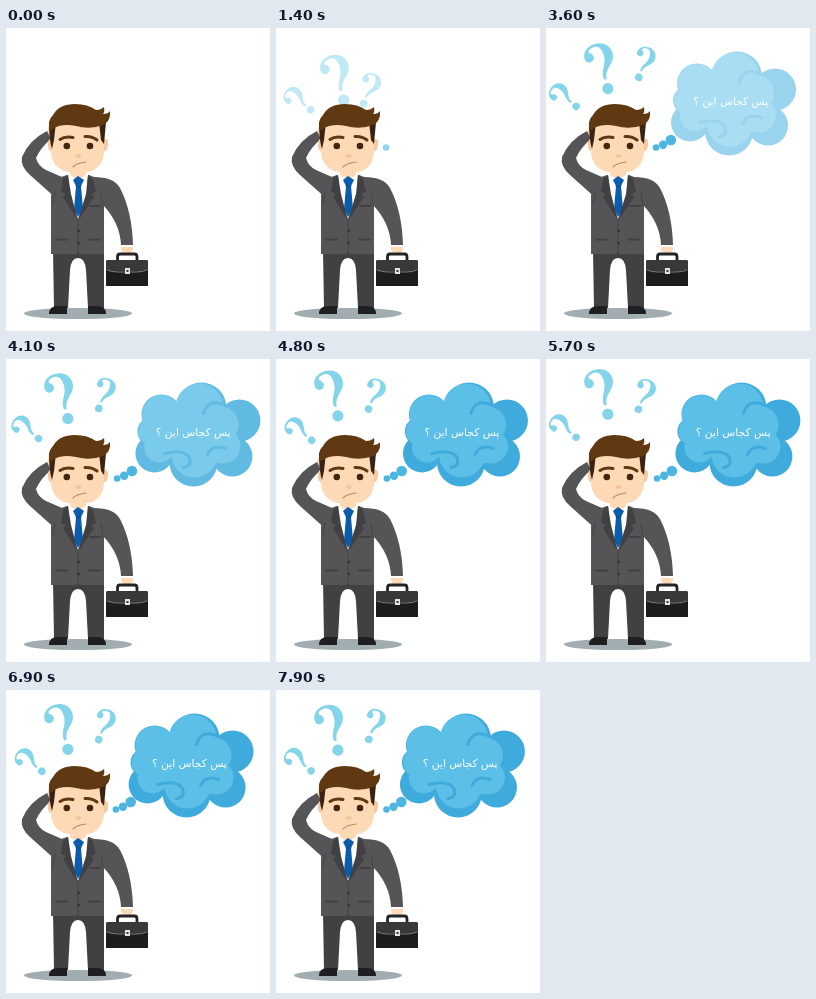
Recreate the animation shown at these times as an HTML page with a canvas. Size 264 by 303 pixels, loop 8 s.

```html
<!DOCTYPE html>
<html lang="fa">
<head>
<meta charset="utf-8">
<title>Puzzled man</title>
<style>
  html, body { margin: 0; width: 100%; height: 100%; overflow: hidden; background: #fff; }
  canvas { display: block; width: 264px; height: 303px; }
</style>
</head>
<body>
<canvas id="stage"></canvas>
<script>
const W = 264, H = 303, LOOP = 8000;
const canvas = document.getElementById('stage');
const ctx = canvas.getContext('2d');
const ratio = window.devicePixelRatio || 1;
canvas.width = W * ratio;
canvas.height = H * ratio;

const clamp = v => Math.min(1, Math.max(0, v));
const ramp = (t, from, to) => clamp((t - from) / (to - from));
const wave = (t, start, period) => Math.cos((t - start) / period * 2 * Math.PI);

function blobs(list) {
  const path = new Path2D();
  for (const [x, y, r] of list) {
    path.moveTo(x + r, y);
    path.arc(x, y, r, 0, 7);
  }
  return path;
}

const fill = (color, d) => ({ color, path: new Path2D(d) });
const line = (color, width, d) => ({ color, width, path: new Path2D(d) });

function paint({ color, width, path }) {
  if (width) {
    ctx.strokeStyle = color;
    ctx.lineWidth = width;
    ctx.stroke(path);
  } else {
    ctx.fillStyle = color;
    ctx.fill(path);
  }
}

const SUIT = '#555557', DARK = '#414042', SKIN = '#fdd9b6', HAIR = '#603811', BURN = '#3b2313';

const shadow = fill('#a1adb1', 'M18 285.5A54 5.6 0 0 1 126 285.5A54 5.6 0 0 1 18 285.5Z');

const man = [
  // legs and shoes
  fill(DARK, 'M47 222H98V280H82L80 242Q79 230 72 230Q65 230 64 242L62 280H48Z'),
  fill('#1f1e20', 'M43 286Q43 278 52 278H61V286ZM100 286Q100 278 91 278H82V286Z'),
  // raised arm
  fill(SKIN, 'M41 106Q41 96 48 97L54 112L46 116Z'),
  fill(SUIT, 'M41 103L45 111Q35 119 30 130Q32 138 40 142L56 149L52 172L24 147Q14 138 16 129Q23 112 41 103Z'),
  // hanging arm
  fill(SKIN, 'M115 217H127V221Q126 226 121 226Q116 225 115 221Z'),
  fill('#fff', 'M114 215H128V219H114Z'),
  fill(SUIT, 'M88 149Q108 149 114 160Q126 183 127 217H115Q114 195 97 177Z'),
  // jacket
  fill(SUIT, 'M61 147L52 150Q46 153 45 168V226H70L72 224L74 226H98V172L96 152L83 147Z'),
  line(DARK, 0.8, 'M47 176L49 164M97 178L95 164M72 192V224'),
  fill('#fff', 'M62 146H82L81 165L72 191L63 165Z'),
  fill(SKIN, 'M64 141H80V147L72 152L64 147Z'),
  fill('#0b5cab', 'M67 152L72 148L78 152L75 158L77 181L72 189L68 181L70 158Z'),
  line('#08467f', 0.8, 'M70 158H75'),
  fill(DARK, 'M62 147L57 151L55 164L60 166L57 169L72 193L65 166Z'),
  fill(DARK, 'M82 147L87 151L90 164L85 166L88 169L72 193L80 166Z'),
  line(DARK, 1.8, 'M50 211.5H61M83 211.5H94M84 178H94'),
  fill('#303032', 'M71.5 203a1.2 1.2 0 1 0 2.4 0a1.2 1.2 0 1 0 -2.4 0M71.5 215a1.2 1.2 0 1 0 2.4 0a1.2 1.2 0 1 0 -2.4 0'),
  // briefcase
  line('#242426', 2.8, 'M111.5 233V229Q111.5 226 114 226H128.5Q131 226 131 229V233'),
  fill('#1d1c1e', 'M100 234Q100 232 102 232H140Q142 232 142 234V258H100Z'),
  fill('#39393b', 'M100 234Q100 232 102 232H140Q142 232 142 234V241Q138 243 131 243H111Q104 243 100 241Z'),
  line('#a9a9aa', 0.7, 'M101 242Q106 244 112 244H130Q137 244 141 242'),
  fill('#e4e4e4', 'M119 240H124V246H119Z'),
  fill('#39393b', 'M120.5 242H122.5V244H120.5Z'),
  // head
  fill('#f6c9a2', 'M47 111Q42 109 42 117Q42 125 48 123ZM96 111Q103 109 102 117Q101 125 96 123Z'),
  fill(SKIN, 'M45 94H98V125Q97 138 86 143Q72 147 58 143Q46 138 45 125Z'),
  fill(BURN, 'M43 94H50L48 112L46 121Q43 112 43 94ZM93 94H100L98 116L95 112Z'),
  fill(HAIR, 'M43 100Q42 92 47 87Q53 76 69 76Q82 76 90 82Q95 82 98 79Q99 84 97 86Q102 86 104 83Q105 93 97 97Q84 102 70 98Q57 95 48 100Q45 104 43 100Z'),
  line(HAIR, 3, 'M54 111.5Q59 108 67 109.5M79 108.5Q86 108 91 112'),
  fill('#43260f', 'M57.5 118a3.3 3.3 0 1 0 6.6 0a3.3 3.3 0 1 0 -6.6 0M80.7 118a3.3 3.3 0 1 0 6.6 0a3.3 3.3 0 1 0 -6.6 0'),
  fill('#f6c39c', 'M69 128Q72 124 76 128Q72 132 69 128Z'),
  line('#c08a64', 1.1, 'M67 139Q71 135 80 134')
];

const mark = new Path2D(
  'M-4 -12A4.2 4.2 0 1 1 -12.4 -13C-12 -20 -6 -23 0 -23C8 -23 13 -18 13 -11' +
  'C13 -1 2 0 1.5 10H-1C-2 1 5 -2 5 -11C5 -17 3 -20.5 -1 -20.5' +
  'C-5 -20.5 -8 -19 -7 -16.5C-5 -16 -4 -14 -4 -12Z' +
  'M-5 18.5a5 5 0 1 0 10 0a5 5 0 1 0 -10 0');

// cloud lobes around the cloud's own centre
const cloudBack = blobs([[4, -27, 25], [-36, -20, 20], [-46, -3, 14], [-43, 19, 19],
  [-4, 28, 24], [42, -14, 21], [35, 22, 20], [0, 4, 36]]);
const cloudFront = blobs([[2, -27, 24], [-36, -20, 19.5], [-45, -3, 14], [-38, 13, 15],
  [-3, 20, 23], [23, -10, 18], [26, 12, 17], [0, 2, 33]]);
const curls = new Path2D('M-33 19Q-14 14 -8 23Q-5 32 -14 33M10 20Q15 9 28 14M6 -21Q10 -36 26 -30');

// side sway of the left question mark: time, offset
const sway = [[0, 1.5], [1400, 0], [2500, -2.5], [3600, -3], [4700, 2.8], [5700, -3], [6900, 2.8], [8000, 2]];

function swayAt(t) {
  const i = sway.findIndex(k => k[0] > t);
  const [t0, a] = sway[i - 1], [t1, b] = sway[i];
  return a + (b - a) * (1 - Math.cos(ramp(t, t0, t1) * Math.PI)) / 2;
}

function drawMark(x, y, size, degrees) {
  ctx.save();
  ctx.translate(x, y);
  ctx.rotate(degrees * Math.PI / 180);
  ctx.scale(size, size);
  ctx.fill(mark);
  ctx.restore();
}

function drawMarks(t) {
  const shown = ramp(t, 550, 2200), left = 1 - shown;
  if (!shown) return;
  const side = swayAt(t);
  const bob = wave(t, 5550, 4000);
  ctx.globalAlpha = shown;
  ctx.fillStyle = '#84d5ea';
  drawMark(22 + side + 3 * left, 71.5 + side / 2 + 4 * left, 0.75, -53);
  drawMark(56 + 12 * left, 38 - 2.7 * bob + 35 * left, 1.12, -16.5);
  drawMark(97.2 - 10 * left, 36.5 + 0.6 * bob + 52 * left, 0.76, 19 + bob);
  ctx.globalAlpha = 1;
}

function drawDots(t) {
  ctx.fillStyle = '#4cb6e1';
  [[110.5, 119.5, 3.3], [117.5, 116.8, 4.2], [125.3, 112, 5.3]].forEach(([x, y, r], i) => {
    ctx.globalAlpha = ramp(t, 1100 + i * 500, 1600 + i * 500);
    ctx.fill(blobs([[x + 0.6 * wave(t, 5700, 800), y, r]]));
  });
  ctx.globalAlpha = 1;
}

function drawCloud(t) {
  const shown = ramp(t, 2700, 4400);
  if (!shown) return;
  const drift = 4 * wave(t, 4970, 800);
  ctx.save();
  ctx.translate(188 + drift, 75.5);
  paint({ color: '#3eabdc', path: cloudBack });
  paint({ color: '#5cbfe7', path: cloudFront });
  paint({ color: '#3eabdc', width: 3, path: curls });
  ctx.restore();

  ctx.fillStyle = '#fff';
  ctx.font = '10.7px "DejaVu Sans", sans-serif';
  ctx.textAlign = 'center';
  ctx.direction = 'rtl';
  ctx.fillText('پس کجاس این ؟', 185.3 + drift * 0.55, 77);

  // white veil fades the cloud in as one piece
  ctx.globalAlpha = 1 - shown;
  ctx.fillRect(112, 5, 152, 130);
  ctx.globalAlpha = 1;
}

function draw(t) {
  ctx.setTransform(ratio, 0, 0, ratio, 0, 0);
  ctx.fillStyle = '#fff';
  ctx.fillRect(0, 0, W, H);
  ctx.lineCap = 'round';
  drawCloud(t);
  drawMarks(t);
  paint(shadow);
  man.forEach(paint);
  drawDots(t);
}

const start = performance.now();
function tick() {
  draw((performance.now() - start) % LOOP);
  requestAnimationFrame(tick);
}
tick();
</script>
</body>
</html>
```
